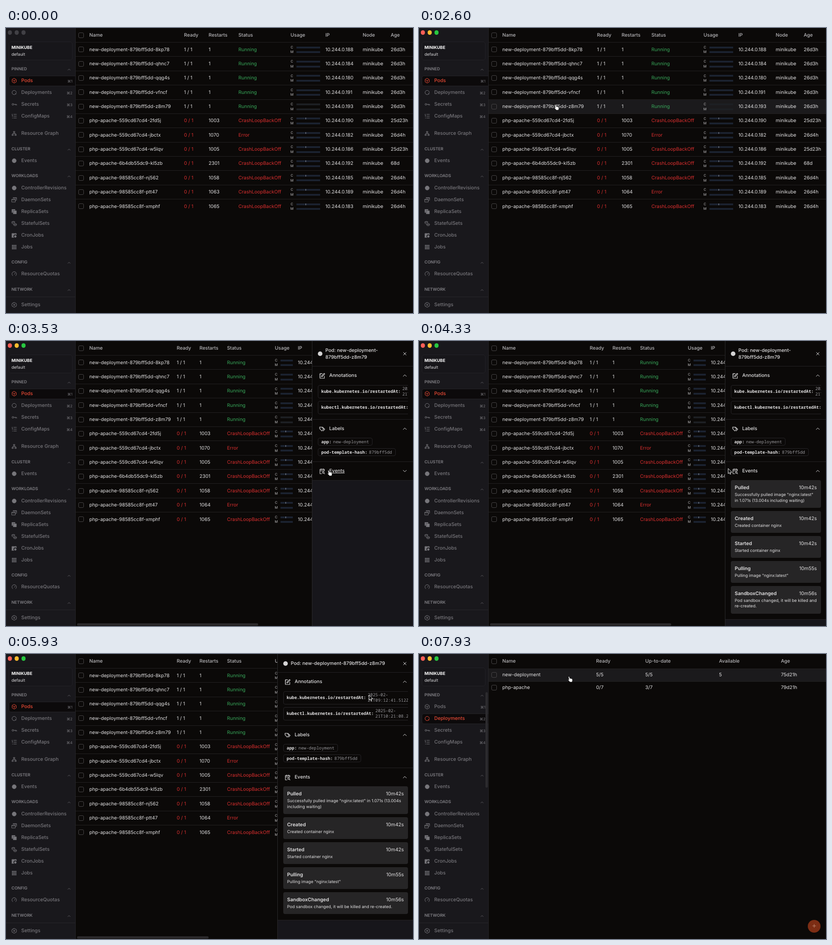
An HTML page that plays this animation: 894x627 px, repeating every 8000 ms.

```html
<!DOCTYPE html>
<html lang="en">
<head>
<meta charset="utf-8">
<title>Cluster dashboard</title>
<style>
  html, body { margin: 0; width: 100%; height: 100%; overflow: hidden; background: #0b0908; }
  body { position: relative; font: 10.5px/16px Inter, sans-serif; color: #e4e3e4; cursor: default; text-rendering: geometricPrecision; }
  div, svg, span { box-sizing: border-box; }
  .abs { position: absolute; white-space: nowrap; }
  svg { fill: none; stroke: currentColor; stroke-width: 1; stroke-linecap: round; stroke-linejoin: round; flex: none; }
  svg.solid { fill: currentColor; stroke-width: .5; }

  #side { position: absolute; width: 153px; height: 627px; background: #19181c; border-right: 1px solid #262529; color: #77767b; overflow: hidden; }
  .nav { font-size: 10.7px; font-weight: 500; }
  .section { font-size: 9px; font-weight: 600; color: #828186; }
  .keys { font-size: 8px; }
  .on { color: #ea4a35; }
  #cluster { left: 6px; top: 30px; width: 140px; height: 41px; background: #17161a; border: 1px solid #222126; border-radius: 5px; }
  #selected { left: 6px; width: 150px; height: 23px; background: #0c0a0b; border: 1px solid #242327; border-radius: 5px; }
  .light { width: 9.4px; height: 9.4px; top: 5.3px; border-radius: 50%; }

  .view { position: absolute; left: 0; top: 0; width: 894px; height: 627px; }
  .head { font-weight: 500; color: #b9b8bb; }
  .line { left: 153px; width: 741px; height: 1px; background: #232122; }
  .hover { left: 153px; width: 741px; background: #1b1a1c; }
  .box { width: 12px; height: 12px; left: 159px; border: 1px solid #474546; border-radius: 3px; }
  .good { color: #38a85a; }
  .bad { color: #dc2f2f; }
  .unit { font-size: 7.5px; color: #c4c3c5; }
  .bar { height: 4px; }
  .tick { width: 1px; height: 4px; background: #8e939c; }
  #add { left: 854px; top: 585px; width: 28px; height: 28px; border-radius: 50%; background: #7c2d14; color: #c08a72; font: 300 17px/27px Inter, sans-serif; text-align: center; }
  #scroll { left: 156px; top: 621px; height: 5px; border-radius: 3px; background: #2b292b; }

  #panel { position: absolute; right: 0; top: 0; height: 627px; background: #17161b; border-left: 1px solid #2a292c; overflow: hidden; }
  #panel > div { background: #0b0908; border-bottom: 1px solid #242224; }
  #title { display: flex; align-items: center; gap: 6.5px; padding: 13px 12px 12px; line-height: 15px; font-weight: 500; }
  #title i { width: 10px; height: 10px; border-radius: 50%; background: #d4d3d4; flex: none; }
  #title span { flex: 1; }
  .bar-title { display: flex; align-items: center; height: 40px; padding: 0 12px 0 15px; gap: 9px; font-weight: 500; }
  .bar-title span { flex: 1; }
  .list { display: flex; flex-direction: column; align-items: flex-start; gap: 6px; margin: 0 11px 0 11.5px; padding-bottom: 12px; overflow: hidden; }
  .list b { font-weight: 600; }
  .note, .tag { display: flex; align-items: center; gap: 3.5px; border: 1px solid #262427; border-radius: 4px; font: 9.4px/12px "Noto Sans Mono", monospace; color: #98979b; }
  .note b, .tag b { color: #e4e3e4; flex: none; }
  .note { height: 29px; padding: 0 7px 2px; min-width: min-content; width: 100%; }
  .tag { height: 17px; padding: 0 7px; white-space: nowrap; }
  .card { width: 100%; padding: 9px; margin-bottom: .5px; border-radius: 4px; background: #262526; font-size: 9.1px; line-height: 12.5px; }
  .card p { display: flex; justify-content: space-between; margin: 0 0 3px; font-size: 10.7px; line-height: 15px; }
  #pointer { position: absolute; left: 0; top: 0; overflow: visible; }
</style>
</head>
<body>
<div id="side"></div>
<div id="panel"></div>
<svg id="pointer" width="1" height="1">
  <path id="arrow" d="M0 0V11L2.6 8.7 4.3 12.4 6 11.6 4.4 8H8Z" fill="#000" stroke="#fff"/>
  <path id="hand" transform="translate(-.8 .4) scale(1.08)" d="M0 0C.8 0 1 .5 1.2 1.2L2 4c.8-.6 1.6-.2 1.8.3.8-.4 1.5 0 1.7.5.9-.3 1.6.2 1.7 1L7.4 8.5 6.6 11.5H2.2L-1.5 7.2c-.5-.8.4-1.5 1-1L.2 6.8-1 1.2C-1.1.5-.6 0 0 0Z" fill="#fff" stroke="#000" stroke-width=".7"/>
  <path id="resize" d="M-6.5 0-3-3.5V-1.2H3V-3.5L6.5 0 3 3.5V1.2H-3V3.5Z" fill="#000" stroke="#fff"/>
</svg>
<script>
const LOOP = 8000;
const $ = id => document.getElementById(id);

// A leading "!" marks a filled icon
const ICONS = {
  pod: 'M6 .8 10.5 3.4V8.6L6 11.2 1.5 8.6V3.4ZM3.5 4.6 6 6 8.5 4.6M6 6V8.8',
  cycle: 'M9 9.6A4.7 4.7 0 1 1 10.7 6.3M10.9 8.2 9 9.7 8.8 7.6',
  key: 'M5 6A1.9 1.9 0 1 1 1.2 6 1.9 1.9 0 0 1 5 6H11.3V8M8.8 6V7.8',
  list: 'M1 2H2.5M5 2H11M1.5 3.5 3 6 1.5 6M5 6H11M2 10H3M5 10H11',
  graph: 'M4.7 1.5H7.3V4H4.7ZM1.5 8H4V10.5H1.5ZM8 8H10.5V10.5H8ZM6 4V6.2M2.8 8V6.2H9.2V8',
  disc: '!M10.7 6A4.7 4.7 0 1 1 1.3 6 4.7 4.7 0 0 1 10.7 6Z',
  windows: 'M3.5 1.2H11.2V6.8H9M3.5 2.2H11.2M.8 4.8H8.5V10.8H.8ZM.8 6H8.5',
  copy: '!M1 1H8V3H3V8H1ZM4 4H11V11H4Z',
  stack: 'M1 2.5C1 1 7 1 7 2.5S1 4 1 2.5V5.5C1 7 5 7 5 6.5M5 7.5C5 6 11 6 11 7.5S5 9 5 7.5V9.8C5 11.3 11 11.3 11 9.8V7.5M7 2.5V5',
  calendar: '!M1 2H11V5.2A3.2 3.2 0 0 0 5.5 11H1ZM3.3 1V2M8.7 1V2M8.5 6.3A2.3 2.3 0 1 0 8.6 6.3Z',
  grid: '!' + [1.5, 5, 8.5].flatMap(y => [1.5, 5, 8.5].map(x => `M${x} ${y}h2v2h-2Z`)).join(''),
  gauge: 'M2.8 10A5 5 0 1 1 9.2 10M6 7 8.3 4.2',
  gear: 'M4.3 1H7.7L8.6 2.6H10.3L11.3 6 10.3 9.4H8.6L7.7 11H4.3L3.4 9.4H1.7L.7 6 1.7 2.6H3.4ZM7.5 6A1.5 1.5 0 1 1 4.5 6 1.5 1.5 0 0 1 7.5 6Z',
  edit: 'M6 1.5H1.5V11H10.5V6.5M4.5 8 5 6 10 1 11.3 2.3 6.5 7.5ZM1 4H2.5M1 8H2.5',
  tags: 'M.8 2H4.5L9 6.2 5.2 10 .8 5.5ZM6.5 2 11.3 6.5 8 10M2.8 4V4.1',
  date: 'M10.5 5V2.2H1.5V11H5M1.5 5H10.5M4 1V3M8 1V3M9.8 8.4A1.7 1.7 0 1 1 6.4 8.4 1.7 1.7 0 0 1 9.8 8.4M9.4 9.7 11 11.2',
  up: 'M2.5 7.8 6 4.3 9.5 7.8',
  down: 'M2.5 4.3 6 7.8 9.5 4.3',
  close: 'M3 3 9 9M9 3 3 9'
};

function icon(name, size = 12, place = '') {
  const solid = ICONS[name][0] === '!';
  return `<svg width="${size}" height="${size}" viewBox="0 0 12 12" class="${solid ? 'solid' : ''} ${place && 'abs'}" style="${place}"><path d="${ICONS[name].replace('!', '')}"/></svg>`;
}

function add(parent, cls, style, html = '') {
  const el = document.createElement('div');
  el.className = 'abs ' + cls;
  Object.assign(el.style, style);
  el.innerHTML = html;
  parent.append(el);
  return el;
}
const px = n => n + 'px';
const label = (parent, x, middle, text, cls = '') => add(parent, cls, { left: px(x), top: px(middle - 8) }, text);

// Sidebar
const side = $('side');
const lights = [3.8, 18.8, 33.8].map(x => add(side, 'light', { left: px(x) }));
add(side, '', {}).id = 'cluster';
add(side, '', {}).id = 'selected';
label(side, 12, 42.5, '<b style="font-size:9.2px;color:#fff">MINIKUBE</b>');
label(side, 12, 58, '<span style="font-size:9.1px;color:#dddcde">default</span>');
for (const [y, name] of [[91, 'PINNED'], [267, 'CLUSTER'], [326, 'WORKLOADS'], [516, 'CONFIG'], [576, 'NETWORK']]) {
  label(side, 12, y, name, 'section');
  side.insertAdjacentHTML('beforeend', icon('up', 9, `left:133.5px;top:${y - 4.5}px`));
}
const navItems = [
  [116, 'Pods', 'pod', 1], [142, 'Deployments', 'cycle', 2], [168, 'Secrets', 'key', 3], [194, 'ConfigMaps', 'list', 4],
  [232, 'Resource Graph', 'graph'], [292, 'Events', 'disc'], [352, 'ControllerRevisions', 'disc'],
  [378, 'DaemonSets', 'windows'], [404, 'ReplicaSets', 'copy'], [430, 'StatefulSets', 'stack'],
  [456, 'CronJobs', 'calendar'], [482, 'Jobs', 'grid'], [541, 'ResourceQuotas', 'gauge'], [609, 'Settings', 'gear']
].map(([y, name, shape, key]) => {
  if (key) add(side, 'keys', { right: '6px', top: px(y - 7) }, '⌘' + key);
  return label(side, 12, y, icon(shape, 12, 'left:0;top:2px') + `<span style="margin-left:21.5px">${name}</span>`, 'nav');
});
add(side, '', { left: 0, top: '591px', width: '152px', height: '1px', background: '#262529' });
const sideScroll = add(side, '', { left: '146px', top: '84px', width: '5px', height: '210px', borderRadius: '3px', background: '#2c2b2e' });

// Tables
const running = ['8kp78 188', 'qhnc7 184', 'qqg4s 180', 'vfncf 191', 'z8m79 193'].map(s => {
  const [id, ip] = s.split(' ');
  return ['new-deployment-879bff5dd-' + id, '1 / 1', '1', 'Running', ip, '26d3h'];
});
const failing = [
  '559cd67cd4-2fd5j 1003 190 25d23h', '559cd67cd4-jbctx 1070 182 26d4h', '559cd67cd4-w5lqv 1005 186 25d23h',
  '6b4db55dc9-kl5zb 2301 192 68d', '98585cc8f-nj562 1058 185 26d4h', '98585cc8f-ptt47 1063 189 26d4h',
  '98585cc8f-xmphf 1065 183 26d4h'
].map(s => {
  const [id, restarts, ip, age] = s.split(' ');
  return ['php-apache-' + id, '0 / 1', restarts, id.endsWith('jbctx') ? 'Error' : 'CrashLoopBackOff', ip, age];
});
const pods = [...running, ...failing];
const flipping = [];

function tableView(columns, names, count, top, pitch) {
  const view = add(document.body, 'view', {});
  $('panel').before(view);
  add(view, 'box', { top: '10px' });
  names.forEach((name, i) => label(view, columns[i], 16, name, 'head'));
  const hovers = [];
  for (let i = 0; i < count; i++) {
    const y = top + i * pitch;
    hovers.push(add(view, 'hover', { top: px(y), height: px(pitch) }));
    add(view, 'line', { top: px(Math.floor(y)) });
    add(view, 'box', { top: px(y + pitch / 2 - 6) });
  }
  return { view, hovers, top, pitch, count };
}

function podView(columns, barWidth) {
  const table = tableView(columns, ['Name', 'Ready', 'Restarts', 'Status', 'Usage', 'IP', 'Node', 'Age'], pods.length, 31.6, 31.36);
  const { view } = table;
  const [nameX, readyX, restartX, statusX, usageX, ipX, nodeX, ageX] = columns;
  pods.forEach(([name, ready, restarts, status, ip, age], i) => {
    const y = 47.6 + i * 31.36, ok = status === 'Running';
    label(view, nameX, y, name);
    label(view, readyX, y, ready, ok ? '' : 'bad');
    const restartCell = label(view, restartX, y, restarts);
    const statusCell = label(view, statusX, y, status, ok ? 'good' : 'bad');
    if (name.endsWith('ptt47')) flipping.push([restartCell, statusCell]);
    ['C', 'M'].forEach((unit, k) => {
      const mid = y - 5 + k * 10.6;
      label(view, usageX + (k ? -.2 : .3), mid + .2, unit, 'unit');
      add(view, 'bar', { left: px(usageX + 12.5), top: px(mid - 2), width: px(barWidth), background: i === 4 ? '#1d1f23' : '#1b2230' });
      if (!ok && !k) add(view, 'tick', { left: px(Math.round(usageX + 12.5 + barWidth * .4)), top: px(mid - 2) });
    });
    label(view, ipX, y, '10.244.0.' + ip);
    label(view, nodeX, y, 'minikube');
    label(view, ageX, y, age);
  });
  return table;
}

const wide = podView([183, 391, 445, 510.5, 625, 701.5, 783.5, 845], 52);
const compact = podView([183, 375, 425, 485.5, 590.5, 641, 717, 773], 27);
const scroll = add(compact.view, '', {});
scroll.id = 'scroll';

const deployColumns = [183, 389, 497, 659, 795];
const deploys = tableView(deployColumns, ['Name', 'Ready', 'Up-to-date', 'Available', 'Age'], 2, 32, 28);
[['new-deployment', '5/5', '5/5', '5', '75d21h'], ['php-apache', '0/7', '3/7', '', '79d21h']].forEach((row, i) =>
  row.forEach((text, c) => label(deploys.view, deployColumns[c], 46 + i * 28, text)));
add(deploys.view, '', {}, '+').id = 'add';

// Detail panel
const barTitle = (shape, name, id = '') => `<div class="bar-title" id="${id}">${icon(shape, 13)}<span><u style="text-decoration:none">${name}</u></span>${icon('up')}</div>`;
const note = (key, time) => `<div class="note"><b>${key}.kubernetes.io/restartedAt:</b><span>2025-02-<wbr>21T${time}Z</span></div>`;
const tag = (key, value) => `<div class="tag"><b>${key}:</b>${value}</div>`;
const card = ([name, age, text]) => `<div class="card"><p><b>${name}</b><span>${age}</span></p>${text}</div>`;
const panel = $('panel');
panel.innerHTML = `
  <div id="title"><i></i><span>Pod: new-deployment-<wbr>879bff5dd-z8m79</span>${icon('close')}</div>
  <div>${barTitle('edit', 'Annotations')}<div class="list" style="padding:1px 0 11px">${note('kube', '09:12:41.512')}${note('kubectl', '10:21:08.204')}</div></div>
  <div>${barTitle('tags', 'Labels')}<div class="list">${tag('app', 'new-deployment')}${tag('pod-template-hash', '879bff5dd')}</div></div>
  <div>${barTitle('date', 'Events', 'events')}<div class="list" id="cards">${[
    ['Pulled', '10m42s', 'Successfully pulled image "nginx:latest" in 1.071s (13.004s including waiting)'],
    ['Created', '10m42s', 'Created container nginx'],
    ['Started', '10m42s', 'Started container nginx'],
    ['Pulling', '10m55s', 'Pulling image "nginx:latest"'],
    ['SandboxChanged', '10m56s', 'Pod sandbox changed, it will be killed and re-created.']
  ].map(card).join('')}</div></div>`;
const eventsWord = $('events').querySelector('u');
const eventsChevron = $('events').querySelector('svg:last-child path');

// Timeline: moments of change and pointer path as [time, x, y]
const FOCUS = 870, RESTART = 2100, OPEN = 2800, EXPAND = 3730, GRAB = 4550, RELEASE = 5400, CLOSE = 6200, SWITCH = 7330;
const PATH = [
  [870, 896, 500], [1450, 565, 496], [1600, 559, 490], [1670, 545, 414], [2300, 302, 170], [2600, 300, 168], [2850, 300, 168],
  [3380, 709, 284], [4050, 709, 284], [4450, 671, 280], [4600, 671, 280], [5070, 614, 280], [5400, 595, 280],
  [5650, 595, 280], [6080, 875, 18], [6230, 875, 18], [6670, 324, 68], [7150, 66, 140], [7380, 66, 140], [7800, 330, 49]
];

function pointerAt(t) {
  const i = PATH.findIndex(p => p[0] > t);
  if (i < 0) return PATH[PATH.length - 1].slice(1);
  if (i === 0) return [-50, -50];
  const [t0, x0, y0] = PATH[i - 1], [t1, x1, y1] = PATH[i];
  const u = (t - t0) / (t1 - t0), e = u * u * (3 - 2 * u);
  return [x0 + (x1 - x0) * e, y0 + (y1 - y0) * e];
}

const panelOpen = t => t >= OPEN && t < CLOSE;
const panelLeft = t => !panelOpen(t) ? 894 : t < GRAB ? 672 : pointerAt(Math.min(t, RELEASE))[0] + 1;
const tableAt = t => t >= SWITCH ? deploys : panelOpen(t) ? compact : wide;

function hoveredRow(t) {
  const [x, y] = pointerAt(t), table = tableAt(t);
  if (x < 153 || x >= panelLeft(t) - 3 || (t > GRAB - 150 && t < RELEASE + 200)) return -1;
  const row = Math.floor((y - table.top) / table.pitch);
  return row < table.count ? row : -1;
}

const show = (el, on) => { el.style.display = on ? '' : 'none'; };

function draw(now) {
  const t = now % LOOP;
  const [x, y] = pointerAt(t), table = tableAt(t), left = panelLeft(t), open = panelOpen(t);

  lights.forEach((el, i) => { el.style.background = t < FOCUS ? '#414045' : ['#fe5f57', '#febc2e', '#28c840'][i]; });
  const chosen = t < SWITCH ? 0 : 1;
  navItems.forEach((el, i) => el.classList.toggle('on', i === chosen));
  $('selected').style.top = px(105 + 26 * chosen);
  show(sideScroll, t > 7080);

  for (const each of [wide, compact, deploys]) show(each.view, each === table);
  for (const [restarts, status] of flipping) {
    restarts.textContent = t < RESTART ? 1063 : 1064;
    status.textContent = t < RESTART ? 'CrashLoopBackOff' : 'Error';
  }
  // Row highlights fade over the last 150 ms of hovering
  const recent = Array.from({ length: 6 }, (_, k) => hoveredRow(t - k * 25));
  table.hovers.forEach((el, i) => { el.style.opacity = recent.filter(row => row === i).length / 6; });
  const visible = left - 153;
  scroll.style.width = px((visible - 5) * visible / 671);

  show(panel, open);
  panel.style.width = px(894 - left);
  const expanded = t >= EXPAND;
  show($('cards'), expanded);
  eventsChevron.setAttribute('d', expanded ? ICONS.up : ICONS.down);
  const overEvents = open && x > left + 12 && y > 266 && y < 306 && t < GRAB;
  eventsWord.style.textDecoration = overEvents ? 'underline' : 'none';

  const resizing = t > GRAB - 120 && t < RELEASE + 250;
  const pointing = recent[0] >= 0 || x < 152 || overEvents || (open && x > 866 && y < 40);
  const kind = resizing ? 'resize' : pointing ? 'hand' : 'arrow';
  for (const id of ['arrow', 'hand', 'resize']) show($(id), id === kind);
  $('pointer').style.transform = `translate(${x}px, ${y}px)`;
  requestAnimationFrame(draw);
}
requestAnimationFrame(draw);
</script>
</body>
</html>
```
